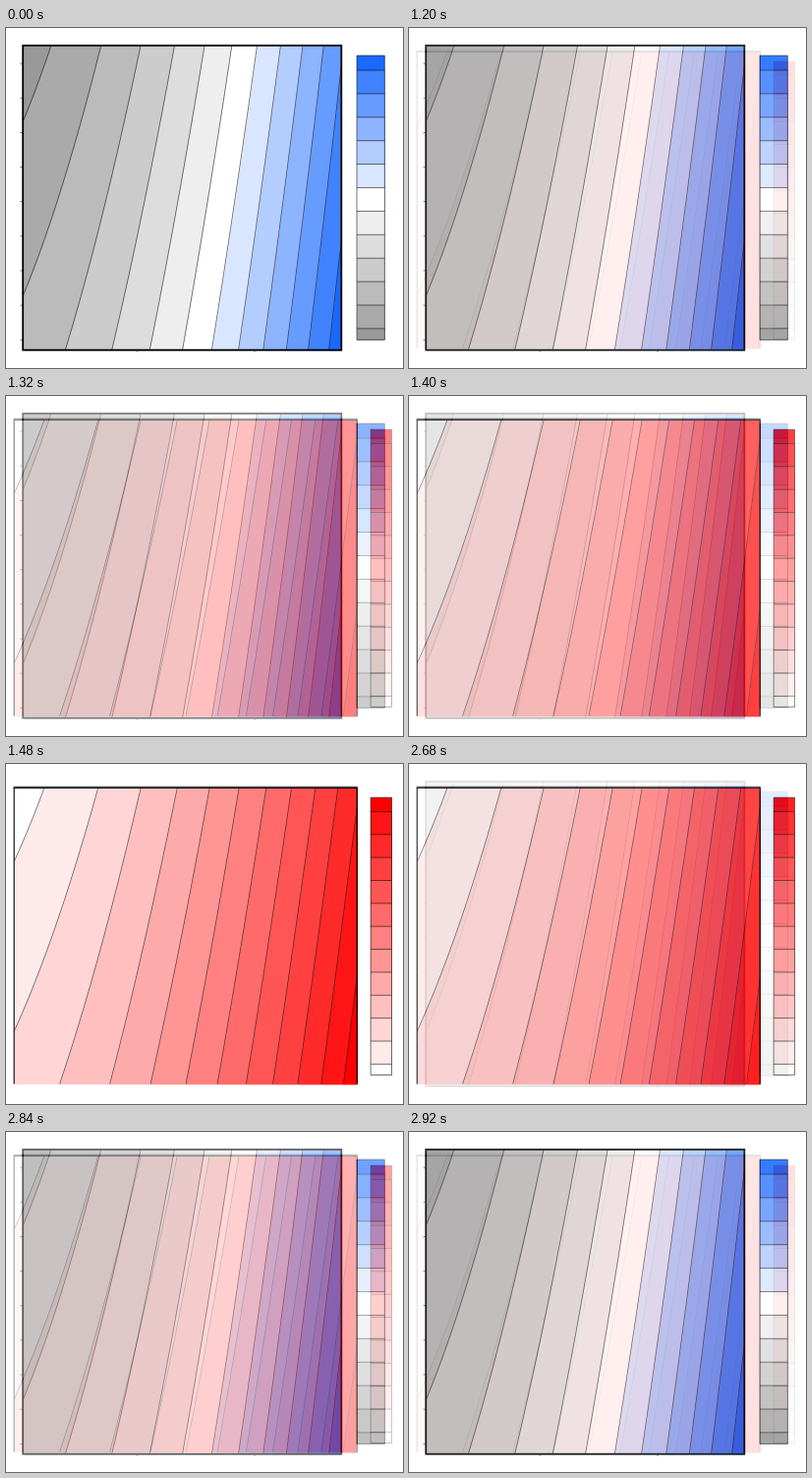
Animation of 404x346 px, one loop 2.96 s. Source, as a matplotlib script:

```python
import numpy as np
import matplotlib.pyplot as plt
from matplotlib.animation import FuncAnimation

W, H, DPI = 404, 346, 100
STEP = 40
FRAMES = 74
BANDS = 13

fig = plt.figure(figsize=(W / DPI, H / DPI), dpi=DPI, facecolor="white")
ax = fig.add_axes([0, 0, 1, 1])


def px(width):
    return width * 72 / DPI


def reset_axes():
    ax.clear()
    ax.set_xlim(0, W)
    ax.set_ylim(H, 0)
    ax.axis("off")


def line(xs, ys, width, alpha=1.0):
    ax.plot(xs, ys, color="black", lw=px(width), alpha=alpha, snap=False,
            solid_capstyle="butt", solid_joinstyle="miter")


def rect(x0, y0, x1, y1, color):
    ax.fill([x0, x1, x1, x0], [y0, y0, y1, y1], color=color, lw=0, snap=False)


def contour(n, v):
    """Horizontal position (0..1) of level n at height v (0..1)."""
    return np.sqrt(np.maximum(0.169 * n + 0.0431 - 0.2951 * v, 0)) - 0.372


def field(box, colors):
    x0, y0, x1, y1 = box
    v = np.linspace(0, 1, 400)
    y = y0 + v * (y1 - y0)
    rect(x0, y0, x1, y1, colors[0])
    for n in range(1, BANDS):
        x = x0 + np.clip(contour(n, v), 0, 1) * (x1 - x0)
        ax.fill_betweenx(y, x, x1, color=colors[n], lw=0, snap=False)
    for n in range(1, BANDS):
        u = contour(n, v)
        u[(u < 0) | (u > 1)] = np.nan
        line(x0 + u * (x1 - x0), y, 0.8, alpha=0.6)


def legend(box, first, step, colors):
    x0, y0, x1, y1 = box
    edges = [y0] + [first + step * i for i in range(BANDS - 1)] + [y1]
    # each cell reaches down to the end so no seam shows between cells
    for top, color in zip(edges, colors[::-1]):
        rect(x0, top, x1, y1, color)
    for y in edges:
        line([x0, x1], [y, y], 0.9, alpha=0.6)
    for x in (x0, x1):
        line([x, x], [y0, y1], 0.9, alpha=0.6)


def snapshot():
    fig.canvas.draw()
    return np.array(fig.canvas.buffer_rgba())[..., :3] / 255


def blue_chart():
    reset_axes()
    grays = [(g / 255,) * 3 for g in range(153, 256, 17)]
    blues = [(1 - 0.15 * i, 1 - 0.098 * i, 1) for i in range(1, 7)]
    colors = grays + blues
    x0, y0, x1, y1 = 17.2, 17.8, 341.3, 327.7
    field((x0, y0, x1, y1), colors)
    for i in range(9):
        y = 36.1 + 35.15 * i
        line([14.3, 17], [y, y], 0.8, alpha=0.6)
    for x in (133.5, 253):
        line([x - 1, x + 1], [329.1, 329.1], 0.8, alpha=0.5)
    ax.add_patch(plt.Rectangle((x0, y0), x1 - x0, y1 - y0, fill=False,
                               ec="black", lw=px(1.8), snap=False))
    legend((357, 28, 385.3, 317.3), 43, 23.9, colors)
    return snapshot()


def red_chart():
    reset_axes()
    colors = [(1, 1 - i / 12, 1 - i / 12) for i in range(BANDS)]
    x0, y0, x1, y1 = 8.2, 24, 357.2, 325.6
    field((x0, y0, x1, y1), colors)
    line([x0 - 0.5, x1 + 0.6], [22.7, 22.7], 0.8, alpha=0.3)
    line([x0 - 0.5, x1 + 0.6], [24.1, 24.1], 1.6)
    line([x0, x0], [y0, y1], 1.1)
    line([x1, x1], [y0, y1], 1.3)
    legend((371.1, 34.1, 392.5, 316.4), 48.4, 23.36, colors)
    return snapshot()


blue, red = blue_chart(), red_chart()
reset_axes()
view = ax.imshow(blue, extent=(0, W, H, 0), aspect="auto",
                 interpolation="nearest")


def red_share(t):
    """Share of the red chart, fading in eighths both ways."""
    if t < 2680:
        k = (t - 1200) // STEP + 1
    else:
        k = 7 - (t - 2680) // STEP
    return min(max(k, 0), 8) / 8


def update(i):
    a = red_share(i * STEP)
    view.set_data((1 - a) * blue + a * red)
    return [view]


anim = FuncAnimation(fig, update, frames=FRAMES, interval=STEP, repeat=True,
                     repeat_delay=0, init_func=lambda: update(0))
plt.show()
```
